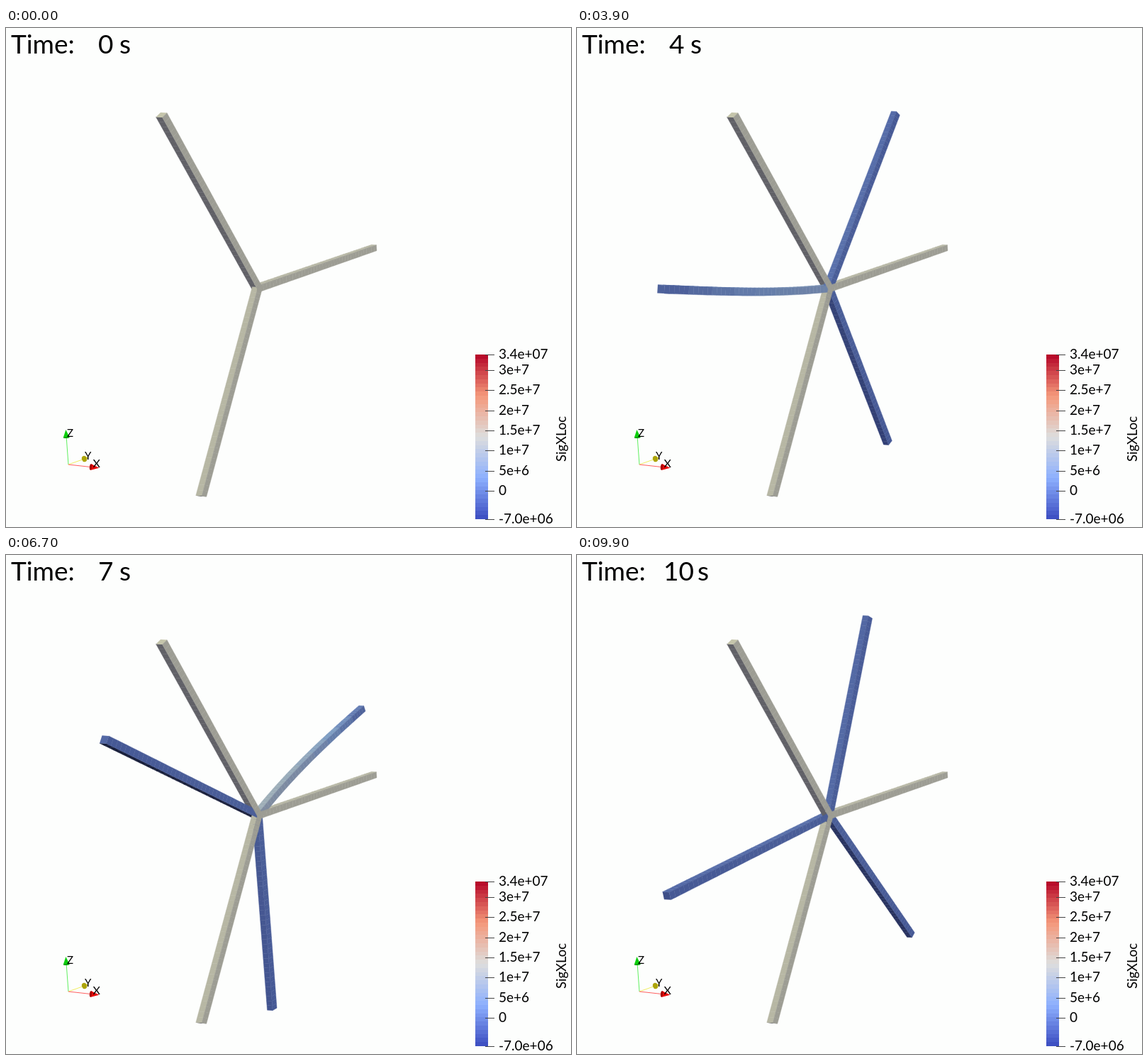
Animation, 797 px wide and 703 px high, one loop 10 s. Source, as an HTML page with a canvas:

```html
<!DOCTYPE html>
<html>
<head>
<meta charset="utf-8">
<style>
html, body { margin: 0; width: 100%; height: 100%; overflow: hidden; background: #fdfefd; }
canvas { display: block; }
</style>
</head>
<body>
<canvas id="stage" width="797" height="703"></canvas>
<script>
const ctx = document.getElementById('stage').getContext('2d');
const RAD = Math.PI / 180, TAU = 2 * Math.PI;
const FONT = 'Lato, "Open Sans", sans-serif';
const HALF = 0.0165;   // half blade width, blade length = 1
const PARTS = 40, CELLS = 8;

// Each push changes the rotor speed (deg/s) smoothly around a moment (s).
const PUSHES = [
  { speed: 166.6, at: 0.25, span: 0.5 },
  { speed: -256.6, at: 1.05, span: 1.8 },
  { speed: 142, at: 3.445, span: 2.8 },
  { speed: 118.6, at: 6.9, span: 1.4 },
  { speed: -88.6, at: 7.7, span: 0.9 }
];

function motion(t) {
  let angle = 0, accel = 0;
  for (const { speed, at, span } of PUSHES) {
    const x = (t - at) / span + 0.5;
    if (x >= 1) angle += speed * (t - at);
    else if (x > 0) {
      const wave = 1 - Math.cos(TAU * x);
      angle += speed * span * (x * x / 2 - wave / (TAU * TAU));
      accel += speed * wave / span;
    }
  }
  return { angle, bend: 9 * Math.tanh(accel / 150) };
}

// diverging blue - grey - red scale
const SCALE = [[59, 76, 192], [141, 176, 254], [221, 221, 221], [244, 152, 122], [180, 4, 38]];

function heat(v) {
  const p = Math.max(0, Math.min(1, v)) * 4, i = Math.min(3, Math.floor(p));
  return SCALE[i].map((c, k) => c + (SCALE[i + 1][k] - c) * (p - i));
}

// warm light, cool shade
function shade([r, g, b], light) {
  return `rgb(${[r, g, b * (1.25 - 0.43 * light)].map(c => Math.round(c * light))})`;
}

const sideLight = deg => Math.max(0.2, 0.44 + 0.45 * Math.cos(deg * RAD));

// perspective view of the rotor plane; z is the position in the blade depth
function project(blade, s, lat, z) {
  const a = (blade.angle + blade.bend * s * (3 - s) / 2) * RAD;
  const c = Math.cos(a), n = Math.sin(a), d = lat * HALF;
  const x = s * c - d * n, y = s * n + d * c;
  const w = 1 - 0.1268 * x + 0.1251 * y;
  return [354.3 + (-117.9 * x + 155.2 * y - 7.9 * z) / w,
    366.5 + (-213.1 * x - 200.1 * y - 0.5 * z) / w];
}

function poly(points, color, seam) {
  ctx.beginPath();
  points.forEach(p => ctx.lineTo(p[0], p[1]));
  ctx.closePath();
  ctx.fillStyle = color;
  ctx.fill();
  if (seam) {
    ctx.strokeStyle = color;
    ctx.lineWidth = 0.4;
    ctx.stroke();
  }
}

function tint(blade, i) {
  const s = (Math.floor(i * CELLS / PARTS) + 0.5) / CELLS;
  return heat(blade.tip + (blade.root - blade.tip) * (1 - s * s));
}

function facesCamera(from, to) {
  return -7.9 * (to[0] - from[0]) - 0.5 * (to[1] - from[1]) > 0;
}

const visibleSide = blade =>
  facesCamera(project(blade, 0.6, 0, 0), project(blade, 0.6, 1, 0)) ? 1 : -1;

function drawSides(blade) {
  const k = visibleSide(blade);
  const light = sideLight(blade.angle + 90 * k);
  for (let i = 0; i < PARTS; i++) {
    const a = i / PARTS, b = (i + 1) / PARTS;
    poly([project(blade, a, k, -.5), project(blade, b, k, -.5),
      project(blade, b, k, .5), project(blade, a, k, .5)], shade(tint(blade, i), light), true);
  }
  if (facesCamera(project(blade, 0.9, 0, 0), project(blade, 1, 0, 0))) {
    poly([[-1, -.5], [1, -.5], [1, .5], [-1, .5]].map(q => project(blade, 1, q[0], q[1])),
      shade(tint(blade, PARTS - 1), sideLight(blade.angle)));
  }
}

function frontPart(blade, i, lo, hi) {
  const a = i / PARTS, b = (i + 1) / PARTS;
  poly([project(blade, a, lo, -.5), project(blade, b, lo, -.5),
    project(blade, b, hi, -.5), project(blade, a, hi, -.5)], shade(tint(blade, i), 0.71), true);
}

function drawFront(blade) {
  for (let i = 0; i < PARTS; i++) frontPart(blade, i, -1, 1);
}

function noise(n) {
  const v = Math.sin(n * 12.9898) * 43758.5453;
  return v - Math.floor(v);
}

const rest = [0, 120, 240].map(angle => ({ angle, bend: 0, root: .5, tip: .5 }));

// the first blade is driven: it bends and carries more stress
function movingBlades(t) {
  const { angle, bend } = motion(t);
  const surge = Math.exp(-(((t - 7.8) / 0.4) ** 2));
  const root = 0.14 + 0.58 * surge;
  return [0, 120, 240].map((step, k) => ({
    angle: angle + step,
    bend: k ? 0 : bend,
    root: k ? root : root + Math.abs(bend) * 0.035,
    tip: k ? 0.12 - 0.04 * surge : 0.13 + 0.36 * surge
  }));
}

function drawRotors(t) {
  const moving = t === 0 ? [] : movingBlades(t);
  const gap = t === 0 ? 0 : ((moving[0].angle + 60) % 120 + 120) % 120 - 60;
  const under = rest.filter(b => visibleSide(b) * gap > 0);
  const over = rest.filter(b => !under.includes(b));
  [...under, ...moving, ...over].forEach(drawSides);
  [...moving, ...rest].forEach(drawFront);

  // coplanar faces flicker through each other where they overlap
  if (Math.abs(gap) < 12) {
    moving.forEach((b, k) => {
      for (let i = 1; i < PARTS; i++) {
        const r = noise(i + 50 * k + Math.round(t * 10) * 7);
        if (r < 0.2) frontPart(b, i, -1, 0.1);
        else if (r < 0.4) frontPart(b, i, -0.1, 1);
      }
    });
  }
}

function text(str, x, y, size) {
  ctx.font = `${size}px ${FONT}`;
  ctx.fillStyle = '#000';
  ctx.fillText(str, x, y);
}

function line(x1, y1, x2, y2, color) {
  ctx.beginPath();
  ctx.moveTo(x1, y1);
  ctx.lineTo(x2, y2);
  ctx.strokeStyle = color;
  ctx.lineWidth = 1;
  ctx.stroke();
}

function drawLegend() {
  const bands = 40, top = 460, tall = 232;
  for (let i = 0; i < bands; i++) {
    const y = top + Math.round(tall * i / bands), next = top + Math.round(tall * (i + 1) / bands);
    ctx.fillStyle = `rgb(${heat(1 - (i + 0.5) / bands).map(Math.round)})`;
    ctx.fillRect(662, y, 18, next - y);
  }
  const tick = (name, v) => {
    const y = top + (34 - v) * tall / 41;
    line(676, Math.floor(y) + .5, 689, Math.floor(y) + .5, '#444');
    text(name, 695, y + 5.5, 19);
  };
  tick('3.4e+07', 34);
  for (let v = 30; v >= 0; v -= 5) tick(v ? (v * 1e6).toExponential() : '0', v);
  tick('-7.0e+06', -7);
  ctx.save();
  ctx.translate(790, 611);
  ctx.rotate(-Math.PI / 2);
  text('SigXLoc', 0, 0, 18.5);
  ctx.restore();
}

// arrow from the axes' origin, with a cone of the given length and base depth
function arrow(name, x, y, length, depth, bright, dark, pale) {
  const ox = 88, oy = 615, a = Math.atan2(y - oy, x - ox);
  line(ox, oy, x, y, pale);
  ctx.save();
  ctx.translate(x, y);
  ctx.rotate(a);
  poly([[0, -4.5], [length, 0], [0, 4.5]], bright);
  ctx.beginPath();
  ctx.ellipse(0, 0, depth, 4.3, 0, 0, TAU);
  ctx.fillStyle = dark;
  ctx.fill();
  ctx.restore();
}

function drawAxes() {
  arrow('Z', 85.2, 577, 11, 1, '#0bd00b', '#0aa00a', '#60f060');
  arrow('Y', 110.5, 607, 5, 3.5, '#d0c60c', '#aca40a', '#f0f060');
  arrow('X', 119.5, 618.5, 12, 1.6, '#e80808', '#a80606', '#ff6060');
  text('Z', 86, 576, 15);
  text('Y', 111, 608, 15);
  text('X', 122.5, 619, 16);
}

function drawTime(t) {
  const n = Math.round(t), wide = n > 9;
  text('Time:', 7, 35.5, 37);
  text(String(n), wide ? 122 : 130, 35.5, 37);
  text('s', wide ? 170 : 160, 35.5, 37);
}

function frame(now) {
  const t = Math.floor(now % 10000 / 100) / 10;
  ctx.fillStyle = '#fdfefd';
  ctx.fillRect(0, 0, 797, 703);
  drawRotors(t);
  drawLegend();
  drawAxes();
  drawTime(t);
  requestAnimationFrame(frame);
}

requestAnimationFrame(frame);
</script>
</body>
</html>
```
